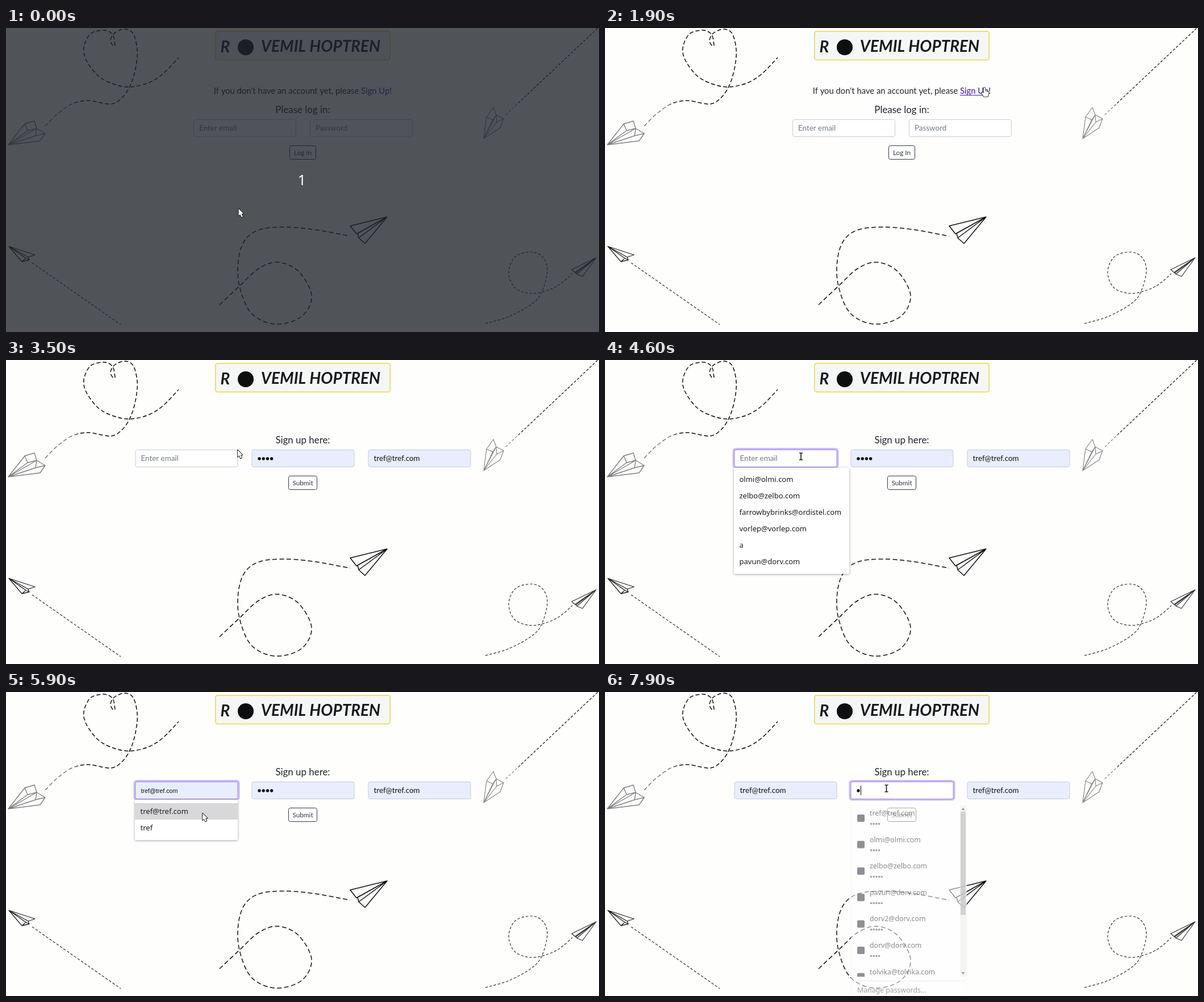
Animation, 1044 px wide and 536 px high, one loop 8000 ms. Source, as an HTML page with a canvas:

```html
<!DOCTYPE html>
<html lang="en">
<head>
<meta charset="utf-8">
<title>Sign up</title>
<style>
html, body { margin: 0; width: 100%; height: 100%; overflow: hidden; background: #fefefd; }
canvas { display: block; }
</style>
</head>
<body>
<canvas id="stage" width="1044" height="536"></canvas>
<script>
const c = document.getElementById('stage').getContext('2d');
const LOOP = 8000, INK = '#212529', MAIL = 'tref@tref.com';
const UI = 'Lato, "Open Sans", sans-serif', SYS = '"Noto Sans", "Open Sans", sans-serif';
const TITLE = '16.9px ' + UI, INPUT = '13.4px ' + UI, SMALL = '11.8px ' + UI;

const MAILS = ['olmi@olmi.com', 'zelbo@zelbo.com', 'farrowbybrinks@ordistel.com',
  'vorlep@vorlep.com', 'a', 'pavun@dorv.com'];
const TYPED = [MAIL, 'trefa', 'trefo@dorv.com', 'tre', 'tref'];
const LOGINS = [[MAIL, 4], ['olmi@olmi.com', 4], ['zelbo@zelbo.com', 5], ['pavun@dorv.com', 5],
  ['dorv2@dorv.com', 5], ['dorv@dorv.com', 4], ['tolvika@tolvika.com', 5]];

// time, x, y of the pointer
const POINTER = [[1000, 409, 318], [1900, 668, 105], [2100, 667, 93], [2500, 659, 109],
  [3000, 659, 109], [3700, 345, 170], [5600, 345, 170], [5900, 345.5, 213],
  [6300, 345.5, 213], [6800, 495.5, 170]];

function pointerAt(t) {
  let a = POINTER[0];
  for (const b of POINTER) {
    if (t < b[0]) {
      if (a === b) break;
      const p = (t - a[0]) / (b[0] - a[0]), e = p * p * (3 - 2 * p);
      return [a[1] + (b[1] - a[1]) * e, a[2] + (b[2] - a[2]) * e];
    }
    a = b;
  }
  return [a[1], a[2]];
}

function text(str, x, y, font, color = INK, align = 'left') {
  c.font = font;
  c.fillStyle = color;
  c.textAlign = align;
  c.textBaseline = 'alphabetic';
  c.fillText(str, x, y);
}

function box(x, y, w, h, r, fill, stroke, width = 1) {
  c.beginPath();
  c.roundRect(x, y, w, h, r);
  if (fill) { c.fillStyle = fill; c.fill(); }
  if (stroke) { c.strokeStyle = stroke; c.lineWidth = width; c.stroke(); }
}

function dots(n, x, y, gap, r, color) {
  c.fillStyle = color;
  for (let i = 0; i < n; i++) {
    c.beginPath();
    c.arc(x + i * gap, y, r, 0, 7);
    c.fill();
  }
}

// smooth dashed curve through pairs of coordinates
function trail(p, dash, width, color) {
  const n = p.length / 2;
  const at = i => { const k = Math.max(0, Math.min(n - 1, i)) * 2; return [p[k], p[k + 1]]; };
  c.beginPath();
  c.moveTo(p[0], p[1]);
  for (let i = 0; i < n - 1; i++) {
    const [a, b, d, e] = [at(i - 1), at(i), at(i + 1), at(i + 2)];
    c.bezierCurveTo(b[0] + (d[0] - a[0]) / 6, b[1] + (d[1] - a[1]) / 6,
      d[0] - (e[0] - b[0]) / 6, d[1] - (e[1] - b[1]) / 6, d[0], d[1]);
  }
  c.setLineDash(dash);
  c.lineWidth = width;
  c.strokeStyle = color;
  c.stroke();
  c.setLineDash([]);
}

function plane(d, width, color) {
  c.lineWidth = width;
  c.strokeStyle = color;
  c.lineJoin = 'round';
  c.stroke(new Path2D(d));
}

function pale(x) {
  const g = c.createLinearGradient(x - 3, 0, x + 3, 0);
  g.addColorStop(0, '#808080');
  g.addColorStop(1, '#0c0c0c');
  return g;
}

function scenery(signup) {
  const long = [7, 4], short = [4.5, 3];
  trail([69, 173, 90, 152, 116, 134, 145, 128, 185, 134, 207, 120, 221, 96, 229, 66, 231, 38,
    224, 10, 209, 2, 191, 9, 184, 22, 190, 34], long, 1.5, pale(signup ? 123 : 116));
  trail([192, 31, 189, 14, 181, 6, 168, 4, 148, 11, 137, 35, 142, 58, 163, 85, 190, 99,
    218, 104, 250, 97, 276, 81, 304, 52], long, 1.5, '#0c0c0c');
  plane('M4 206L33 169L50 164L54 177L69 186L60 199ZM33 169L38 181L54 177L4 206L38 181M54 177L52 190L69 186M4 206L52 190', 1.4, '#808080');

  trail([880, 153, 1042, 0], short, 1.2, pale(signup ? 902 : 898));
  plane('M841 195L846 157L858 140L863 153L876 160L870 176ZM846 157L857 162L863 153L841 195L857 162M863 153L864 166L876 160M841 195L864 166', 1.2, '#888');

  plane('M5 385L51 400L39 404L41 409L28 412ZM5 385L39 404M5 385L35 406L41 409M35 406L28 412', 1.3, '#222');
  trail([46, 414, 202, 523], short, 1.2, '#303030');

  trail([376, 488, 411, 455, 445, 424, 479, 413, 515, 429, 538, 472, 520, 509, 474, 522,
    432, 503, 411, 455, 409, 410, 420, 375, 445, 356, 487, 351, 540, 355, 606, 367], [8, 4.5], 1.5, '#111');
  plane('M671 333L606 349L617 363ZM671 333L619 362L621 370L632 380ZM671 333L621 370', 1.5, '#111');

  trail([844, 521, 885, 509, 925, 487, 943, 466, 953, 428, 945, 404, 925, 395, 897, 403,
    885, 430, 896, 458, 926, 468, 960, 460, 980, 448, 997, 433], short, 1.2, '#333');
  plane('M1039 405L996 426L1003 432ZM1039 405L1003 430L1005 434L1015 438ZM1039 405L1005 434', 1.2, '#333');
}

function banner() {
  box(368.8, 5.8, 307.4, 50.6, 4, '#f5f7f7', '#ecdb55', 1.7);
  const font = 'italic 700 28px ' + UI;
  text('R', 386, 43, font, '#17191d', 'center');
  dots(1, 422, 34, 0, 14, '#0d0e10');
  text('VEMIL HOPTREN', 554, 42, font, '#17191d', 'center');
}

function field(x, y, label, o = {}) {
  const ring = o.ring || 0;
  if (ring) box(x - 1, y - 1, 183, 32.5, 4, null, `rgba(189,168,247,${ring * 0.8})`, 4);
  box(x + 0.5, y + 0.5, 180, 30, 3, o.auto ? '#e8eefd' : '#fff',
    ring ? '#a78fe0' : o.auto ? '#c6cbdc' : '#c5ccd4');
  if (label) text(label, x + 10, y + 20, o.font || INPUT, o.filled ? '#111' : '#757b82');
  if (o.dots) dots(o.dots, x + 13.5, y + 16, 7.2, 2.7, '#111');
  if (o.caret) {
    c.fillStyle = '#111';
    c.fillRect(Math.round(x + o.caret), y + 7, 1, 17);
  }
}

function button(label, x, y, w) {
  box(x + 0.5, y + 0.5, w - 1, 24, 3, '#fff', '#343a40');
  text(label, x + w / 2, y + 16.5, SMALL, '#343a40', 'center');
}

function login(hover) {
  const font = '14.8px ' + UI, lead = "If you don't have an account yet, please ", link = 'Sign Up';
  c.font = font;
  const a = c.measureText(lead).width, b = c.measureText(link).width;
  const x = 522.5 - c.measureText(lead + link + '!').width / 2;
  text(lead, x, 116, font);
  text(link, x + a, 116, font, '#4516ae');
  if (hover) c.fillRect(x + a, 118, b, 1);
  text('!', x + a + b, 116, font);
  text('Please log in:', 522.5, 150, TITLE, INK, 'center');
  field(330, 161, 'Enter email');
  field(535, 161, 'Password');
  button('Log In', 499, 207, 47);
}

function panel(x, y, w, h) {
  c.save();
  c.shadowColor = 'rgba(0,0,0,.35)';
  c.shadowBlur = 4;
  c.shadowOffsetY = 1;
  box(x, y, w, h, 2, '#fff');
  c.restore();
}

function mailList(items, w, hover) {
  panel(227, 190, w, items.length * 29 + 13);
  if (hover) {
    c.fillStyle = '#d8d8da';
    c.fillRect(227, 196, w, 29);
  }
  items.forEach((s, i) => text(s, 236.5, 215 + i * 29, '500 13px ' + SYS, '#1c1c1c'));
}

function triangle(x, y, d) {
  c.fillStyle = '#555';
  c.beginPath();
  c.moveTo(x - 3, y + d);
  c.lineTo(x + 3, y + d);
  c.lineTo(x, y - d);
  c.fill();
}

function loginList(alpha) {
  c.save();
  c.globalAlpha = alpha;
  // a see-through panel would let its own shadow show
  if (alpha < 1) box(433.5, 192, 203, 360, 2, '#fff', '#f2f2f2');
  else panel(434, 192, 202, 360);
  c.save();
  c.beginPath();
  c.rect(434, 192, 191, 310);
  c.clip();
  LOGINS.forEach(([name, n], i) => {
    const y = 213 + i * 46.6;
    box(444, y + 3, 13, 13, 2, '#30343c');
    text(name, 466, y + 5, '12.3px ' + SYS, '#2b2b2b');
    dots(n, 468.5, y + 19.5, 4.7, 1.8, '#555');
  });
  c.restore();
  c.fillStyle = '#eee';
  c.fillRect(625, 200, 11, 302);
  c.fillStyle = '#b4b4b4';
  c.fillRect(626, 211, 9, 182);
  triangle(630.5, 206, 2);
  triangle(630.5, 496, -2);
  c.fillStyle = '#ddd';
  c.fillRect(434, 509, 202, 1);
  text('Manage passwords…', 444, 530, '12.3px ' + SYS, '#555');
  c.restore();
}

function signupPage(t) {
  text('Sign up here:', 522.5, 147, TITLE, INK, 'center');
  button('Submit', 497, 204, 51);

  const auto = t >= 3100, preview = t >= 5800 && t < 6400, done = t >= 6400;
  let ring = t < 4100 ? 0 : t < 4500 ? 0.25 : t < 4600 ? 0.6 : 1;
  if (t >= 7000) ring = t < 7100 ? 0.6 : t < 7400 ? 0.2 : 0;
  let mail = 'Enter email';
  if (t >= 5100) mail = t < 5200 ? 't' : 'tref';
  if (t >= 5800) mail = MAIL;
  c.font = INPUT;
  field(227.5, 158, mail, {
    ring, filled: t >= 5100, auto: t >= 5800,
    font: preview && '10.7px "Liberation Sans", Arial, sans-serif',
    caret: done && t < 7000 && 11 + c.measureText(MAIL).width
  });

  const typed = t >= 7900;
  field(432.5, 158, auto ? '' : 'Password', {
    ring: t < 7000 ? 0 : t < 7100 ? 0.3 : t < 7400 ? 0.8 : 1,
    auto: auto && !typed, dots: typed ? 1 : auto ? 4 : 0, caret: typed && 17
  });
  field(637.5, 158, auto ? MAIL : 'Add a username', { auto, filled: auto });

  if (t >= 4100 && t < 5100) mailList(MAILS, 203);
  else if (t >= 5200 && t < 5500) mailList(TYPED, 181);
  else if (t >= 5500 && t < 6400) mailList([MAIL, 'tref'], 181, preview);
  if (t >= 7200) loginList(typed ? 0.55 : 1);
}

function status() {
  box(-4, 521, 134, 20, 3, '#050505');
  text('localhost:3000/signup', 3, 535, '11.8px ' + SYS, '#a0a0a0');
}

function shape(d, x, y, fill, stroke, width) {
  c.save();
  c.translate(x, y);
  const p = new Path2D(d);
  c.lineJoin = 'round';
  c.lineWidth = width;
  c.strokeStyle = stroke;
  c.stroke(p);
  if (fill) { c.fillStyle = fill; c.fill(p); }
  c.restore();
}

function cursor(kind, x, y) {
  if (kind === 'beam') {
    const d = 'M-3 -6H-1L0 -5L1 -6H3M0 -5V5M-3 6H-1L0 5L1 6H3';
    shape(d, x, y, null, '#fff', 3.4);
    shape(d, x, y, null, '#1a1a1a', 1.6);
  } else if (kind === 'hand') {
    shape('M-1.5 1Q0 -1 1.5 1V6L6 7Q8 8 7.5 10L6 16H-1L-5 10Q-5 8 -3.5 8.5L-1.5 10Z', x, y, '#fff', '#111', 1.6);
  } else {
    shape('M.6 .8V13L3.4 10.4L5.6 15.4L7.8 14.4L5.6 9.6H9.2Z', x, y, '#fff', '#111', 1.8);
  }
}

function draw(ms) {
  const t = Math.floor(ms / 100) * 100, signup = t >= 2800;
  const [x, y] = pointerAt(t);
  const overLink = !signup && x > 623 && x < 676 && y > 103 && y < 121;
  const overField = signup && y > 158 && y < 189 && (x - 227) % 205 < 181;

  c.fillStyle = '#fefefd';
  c.fillRect(0, 0, 1044, 536);
  scenery(signup);
  banner();
  if (signup) signupPage(t);
  else login(overLink);
  if (t >= 2400 && t < 3200) status();
  if (t < 500) {
    c.fillStyle = 'rgba(31,35,43,.78)';
    c.fillRect(0, 0, 1044, 536);
    text('1', 521, 277, '500 25px ' + SYS, '#fff', 'center');
  }
  cursor(overLink ? 'hand' : overField ? 'beam' : 'arrow', x, y);
}

const start = performance.now();
function tick() {
  draw((performance.now() - start) % LOOP);
  requestAnimationFrame(tick);
}
tick();
</script>
</body>
</html>
```
